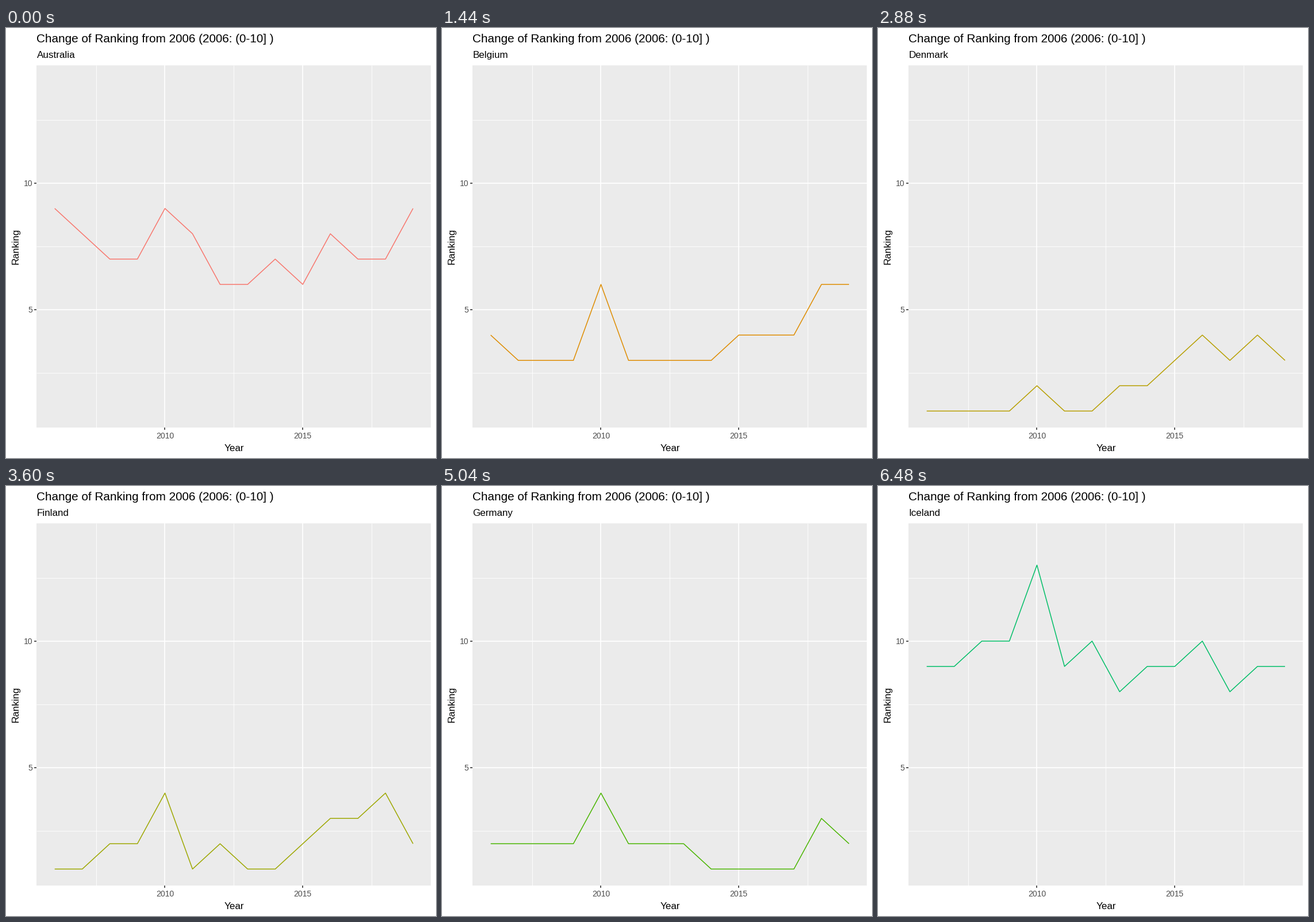
Recreate the animation shown at these times as a matplotlib script. Size 748 px wide and 748 px high, loop 6.75 s.

```python
import matplotlib.pyplot as plt
from matplotlib.animation import FuncAnimation
from matplotlib.patches import Rectangle

SIZE, DPI = 748, 88
PT = 72 / DPI              # points per pixel
TICK_MS, LOOP_MS, HOLD_MS = 90, 6750, 720

plt.rcParams["font.family"] = "Liberation Sans"

# country, line colour, rank for each year 2006-2019
SERIES = [
    ("Australia", "#F8766D", "98779866768779"),
    ("Austria", "#EE8044", "55558555455455"),
    ("Belgium", "#DE8C00", "43336333344466"),
    ("Canada", "#CD9600", "65449964246666"),
    ("Denmark", "#B79F00", "11112112234343"),
    ("Finland", "#9DA700", "11224121123342"),
    ("France", "#7CAE00", "34665334333434"),
    ("Germany", "#49B500", "22224222111132"),
    ("Greece", "#00BA38", [9, 9, 9, 9, 12, 8, 7, 6, 6, 7, 7, 6, 7, 6]),
    ("Iceland", "#00BE67", [9, 9, 10, 10, 13, 9, 10, 8, 9, 9, 10, 8, 9, 9]),
]

LEFT, RIGHT, TOP, BOTTOM = 53.5, 739.5, 65, 694.7


def px(year):
    return 84.7 + (year - 2006) * 47.95


def py(rank):
    return 269.8 + (10 - rank) * 44.06


fig = plt.figure(figsize=(SIZE / DPI, SIZE / DPI), dpi=DPI, facecolor="white")
ax = fig.add_axes([0, 0, 1, 1])
ax.set(xlim=(0, SIZE), ylim=(SIZE, 0))
ax.axis("off")


def label(x, y, text, size, color="black", **kw):
    return ax.text(x, y, text, fontsize=size * PT, color=color,
                   va="baseline", **kw)


def segment(x0, y0, x1, y1, color, width):
    ax.plot([x0, x1], [y0, y1], color=color, lw=width * PT,
            solid_capstyle="butt")


def grid(years, ranks, width):
    for year in years:
        segment(px(year), TOP, px(year), BOTTOM, "white", width)
    for rank in ranks:
        segment(LEFT, py(rank), RIGHT, py(rank), "white", width)


ax.add_patch(Rectangle((LEFT, TOP), RIGHT - LEFT, BOTTOM - TOP,
                       facecolor="#EBEBEB", edgecolor="none"))
grid((2007.5, 2012.5, 2017.5), (2.5, 7.5, 12.5), 0.9)
grid((2010, 2015), (5, 10), 1.7)

for year in (2010, 2015):
    segment(px(year), BOTTOM, px(year), BOTTOM + 4.3, "#333333", 1.6)
    label(px(year), 714, str(year), 14, "#4D4D4D", ha="center")
for rank in (5, 10):
    segment(LEFT - 4.3, py(rank), LEFT, py(rank), "#333333", 1.6)
    label(46.5, py(rank) + 5.2, str(rank), 14, "#4D4D4D", ha="right")

label(53.5, 25, "Change of Ranking from 2006 (2006: (0-10] )", 20.8)
label(396.5, 736, "Year", 17, ha="center")
label(22, 380, "Ranking", 17, ha="center", rotation=90,
      rotation_mode="anchor")

country = label(53.5, 52, "", 17)
line, = ax.plot([], [], lw=1.5 * PT, solid_capstyle="butt",
                solid_joinstyle="round")


def draw(i):
    name, color, ranks = SERIES[i * TICK_MS // HOLD_MS]
    country.set_text(name)
    line.set_data([px(2006 + k) for k in range(len(ranks))],
                  [py(int(r)) for r in ranks])
    line.set_color(color)
    return country, line


anim = FuncAnimation(fig, draw, frames=LOOP_MS // TICK_MS, interval=TICK_MS,
                     init_func=lambda: draw(0), repeat=True, repeat_delay=0)
plt.show()
```
